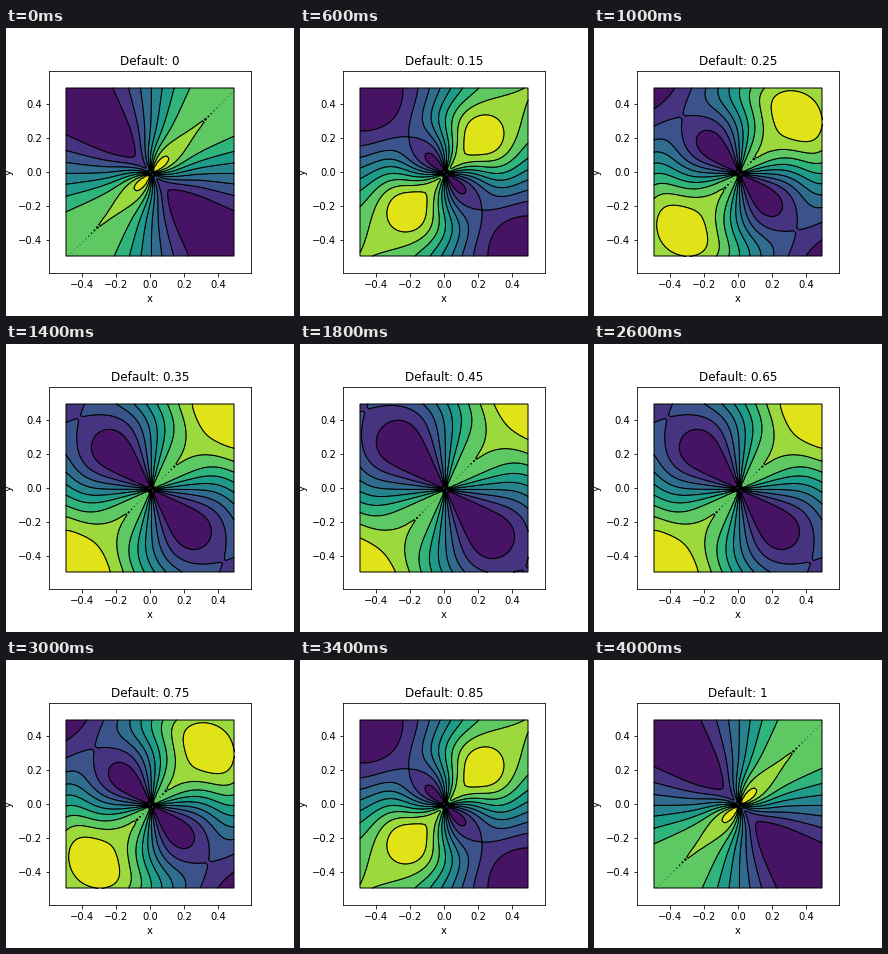
Write a matplotlib script that moves like this. It is 288 by 288 pixels and loops after 4200 ms.

```python
import numpy as np
import matplotlib.pyplot as plt
from matplotlib.animation import FuncAnimation

STEPS = 21
CELLS = 60
EDGE = 0.5 - 0.5 / CELLS
LEVELS = np.linspace(-1, 1.5, 11)
COLORS = plt.cm.viridis((np.arange(10) + 0.5) / 10)
TICKS = [-0.4, -0.2, 0, 0.2, 0.4]

# The half-open sample range puts the origin half a cell right and below centre.
centers = np.linspace(-EDGE, EDGE, CELLS)
samples = np.arange(-3, 3, 6 / CELLS)
u, v = np.meshgrid(samples, -samples[::-1])
radius = np.hypot(u, v)
angular = np.sin(2 * np.arctan2(v, u))

fig = plt.figure(figsize=(4, 4), dpi=72, facecolor="white")
ax = fig.add_axes([0.15, 0.15, 0.7, 0.7])


def field(t):
    """Two-lobed angular wave plus a ring that swells and shrinks."""
    ring = 4 * np.sin(np.pi * t)
    return angular + 0.5 * np.exp(-(radius - ring) ** 2)


def draw(step):
    t = step / (STEPS - 1)
    ax.clear()
    bands = ax.contourf(centers, centers, field(t), levels=LEVELS,
                        colors=COLORS, antialiased=True)
    bands.set_edgecolor("black")
    bands.set_linewidth(1)
    limits = (-1.2 * EDGE, 1.2 * EDGE)
    ax.set(xlim=limits, ylim=limits, xlabel="x", ylabel="y",
           xticks=TICKS, yticks=TICKS)
    ax.set_title(f"Default: {t:.2g}", fontsize=12)
    return []


animation = FuncAnimation(fig, draw, frames=STEPS, interval=200,
                          init_func=lambda: [], repeat=True, repeat_delay=0)
plt.show()
```
